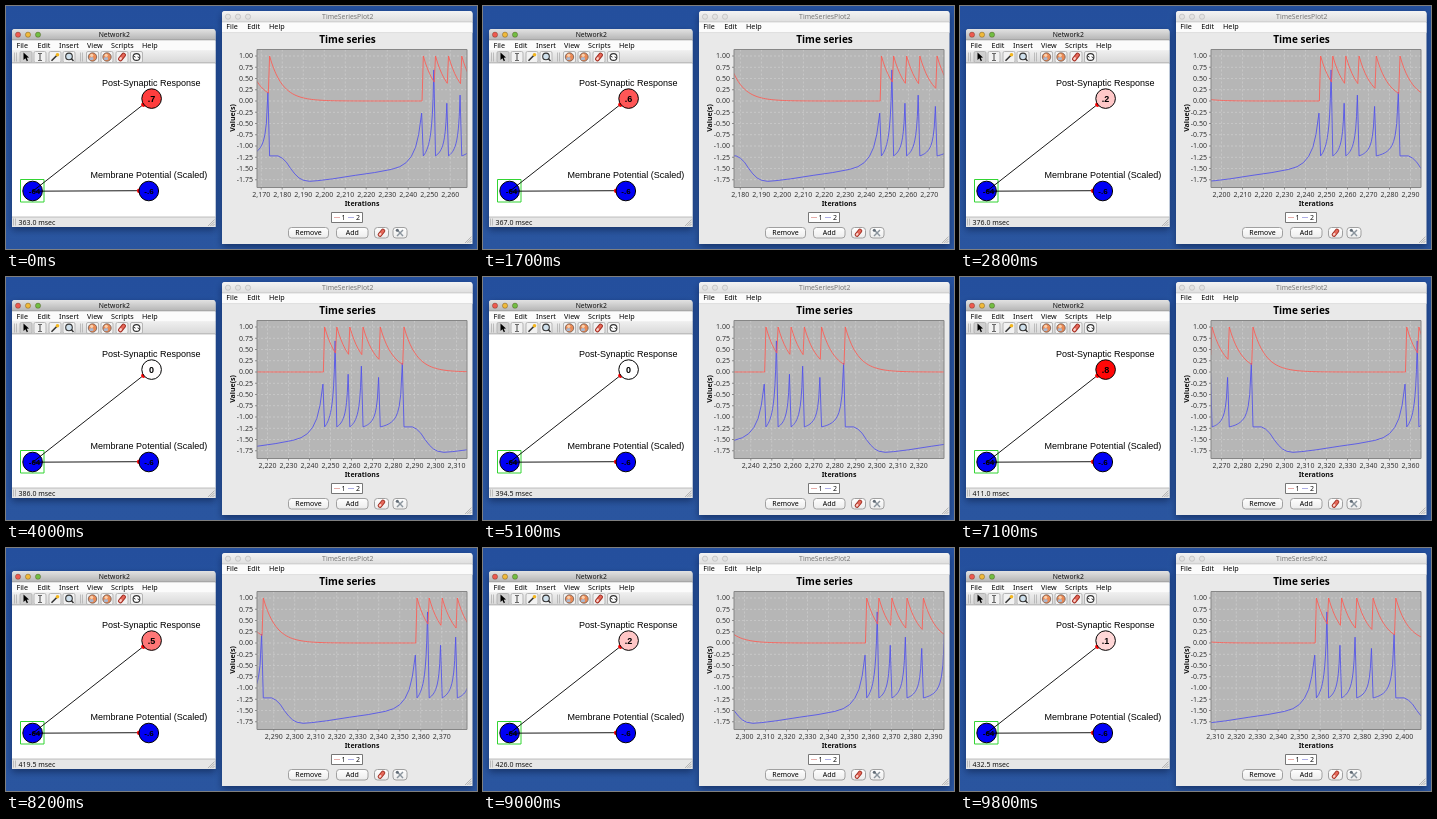
An HTML page with a canvas that plays this animation: 471x243 px, repeating every 10 s.

```html
<!DOCTYPE html>
<html lang="en">
<head>
<meta charset="utf-8">
<title>Spiking network</title>
<style>
html, body { margin: 0; width: 100%; height: 100%; overflow: hidden; background: #26509b; }
canvas { display: block; }
</style>
</head>
<body>
<canvas id="stage" width="471" height="243"></canvas>
<script>
const c = document.getElementById('stage').getContext('2d');
const LOOP = 10000, SANS = '"Noto Sans", "Open Sans", sans-serif', ARIAL = '"Liberation Sans", Arial, sans-serif';
const PLOT = { x: 251, y: 43.5, w: 210, h: 138 };
const REST = -1.22, DECAY = 6;

// Simulation clock: [seconds, simulated msec]; it idles before the run starts.
const clock = [[0, 363], [1.2, 363], [1.7, 367], [2.8, 376], [4, 386], [4.1, 386],
  [6.1, 403], [8.2, 419.5], [9.8, 432.5], [10, 432.5]];

// Spikes: [iteration, height reached just before it]
const peaks = [-0.27, 0.69, -0.05, 0.13, -0.12, 0.2];
const burst = its => its.map((it, i) => [it, peaks[i]]);
const spikes = [[2163, -0.12], [2174, 0.2],
  ...burst([2247.2, 2253, 2259.2, 2265.5, 2273.7, 2285]),
  ...burst([2358.2, 2364, 2370.2, 2377.4, 2385.2, 2396]), [2469, -0.27]];

// Slow recovery after a burst: [iterations since spike, potential]
const recovery = [[0, REST], [4, REST], [6, -1.27], [8, -1.36], [10, -1.5], [12, -1.62], [14, -1.71],
  [16, -1.76], [19, -1.785], [23, -1.77], [30, -1.73], [41, -1.65], [50, -1.59], [58, -1.52],
  [62, -1.46], [65, -1.37], [67.5, -1.23], [69.5, -1.03], [71, -0.74], [72.4, -0.27]];

const synapse = [], membrane = [];
for (let k = 0; k < spikes.length - 1; k++) {
  const a = spikes[k][0], [b, top] = spikes[k + 1], gap = b - a;
  for (let d = 0; d < gap - 0.6; d++) synapse.push([a + d, Math.exp(-d / DECAY)]);
  synapse.push([b - 0.6, Math.exp((0.6 - gap) / DECAY)]);
  if (gap > 40) {
    for (const [d, v] of recovery) membrane.push([a + d, v]);
  } else {
    const len = gap - 0.8, g = s => 1 / (s + 0.9);
    for (let i = 0; i <= 14; i++) {
      const s = len * (1 - i / 14);
      membrane.push([a + len - s, REST + (top - REST) * (g(s) - g(len)) / (g(0) - g(len))]);
    }
  }
}

function interp(pts, t) {
  let i = 1;
  while (i < pts.length - 1 && pts[i][0] < t) i++;
  const [x0, y0] = pts[i - 1], [x1, y1] = pts[i];
  return y0 + (y1 - y0) * (t - x0) / (x1 - x0);
}

function response(it) {
  const last = spikes.filter(s => s[0] <= it).pop();
  return Math.exp(-(it - last[0]) / DECAY);
}

function rect(x, y, w, h, fill, stroke, r = 0) {
  c.beginPath();
  c.roundRect(x, y, w, h, r);
  if (fill) { c.fillStyle = fill; c.fill(); }
  if (stroke) { c.strokeStyle = stroke; c.lineWidth = 1; c.stroke(); }
}

function disc(x, y, r, fill, stroke, lw = 1) {
  c.beginPath();
  c.arc(x, y, r, 0, 7);
  if (fill) { c.fillStyle = fill; c.fill(); }
  if (stroke) { c.strokeStyle = stroke; c.lineWidth = lw; c.stroke(); }
}

function line(x0, y0, x1, y1, color, lw = 1) {
  c.beginPath();
  c.moveTo(x0, y0);
  c.lineTo(x1, y1);
  c.strokeStyle = color;
  c.lineWidth = lw;
  c.stroke();
}

function text(s, x, y, size = 7, align = 'left', color = '#111', weight = '', family = SANS) {
  c.font = `${weight} ${size}px ${family}`;
  c.textAlign = align;
  c.fillStyle = color;
  c.fillText(s, x, y);
}

function fade(y0, y1, top, bottom) {
  const g = c.createLinearGradient(0, y0, 0, y1);
  g.addColorStop(0, top);
  g.addColorStop(1, bottom);
  return g;
}

function frame(x, y, w, h, title, active) {
  c.save();
  c.shadowColor = 'rgba(0,10,40,.45)';
  c.shadowBlur = 7;
  c.shadowOffsetY = 3;
  rect(x, y, w, h, '#e9e9e9', null, [3, 3, 0, 0]);
  c.restore();
  const bar = active ? fade(y, y + 11, '#e2e2e2', '#b4b4b4') : fade(y, y + 11, '#f3f3f3', '#dedede');
  rect(x, y, w, 11, bar, null, [3, 3, 0, 0]);
  line(x, y + 11, x + w, y + 11, active ? '#8a8a8a' : '#bcbcbc', 0.7);
  const lights = active ? ['#ee5a50', '#efb93b', '#72bd43'] : ['#e2e2e2', '#e2e2e2', '#e2e2e2'];
  lights.forEach((f, i) => disc(x + 6 + i * 10, y + 5.7, 2.6, f, active ? 'rgba(60,40,20,.55)' : '#b4b4b4', 0.6));
  text(title, x + w / 2 + 0.5, y + 8.4, 6.8, 'center', active ? '#111' : '#777', active ? '500' : '');
  rect(x, y + 11.4, w, 10.2, '#fbfbfb');
}

function menu(items, y) {
  for (const [s, x] of items) text(s, x, y, 7.2, 'left', '#000');
}

function grip(x, y) {
  for (let d = 2; d < 8; d += 2.2) line(x - d, y, x, y - d, '#999', 0.7);
}

function eraser(x, y, s = 1) {
  c.save();
  c.translate(x, y);
  c.scale(s, s);
  c.rotate(-0.9);
  rect(-4.3, -1.8, 8.6, 3.6, '#e8685a', '#a03024', 1.4);
  rect(-3.6, -1.2, 3, 2.2, '#f8cfc8', null, 1);
  c.restore();
}

function toolbar() {
  rect(6, 44.5, 203.5, 12.5, fade(44, 57, '#f0f0f0', '#d8d8d8'));
  line(6, 57, 209.5, 57, '#999', 0.8);
  for (const x of [8.5, 10.5, 74.5, 76.5]) line(x, 46.5, x, 55.5, '#aaa', 0.7);
  for (const x of [20, 34, 49, 63, 86.5, 101, 116, 130.5])
    rect(x - 6, 45.5, 12, 11, x === 20 ? '#cfcfcf' : '#f2f2f2', '#b5b5b5', 1.5);
  // pointer
  c.fillStyle = '#000';
  c.beginPath();
  c.moveTo(17.5, 46.5);
  c.lineTo(17.5, 54);
  c.lineTo(19.4, 52.3);
  c.lineTo(20.8, 55.2);
  c.lineTo(22, 54.5);
  c.lineTo(20.7, 51.8);
  c.lineTo(23, 51.5);
  c.fill();
  // text cursor
  line(34, 47.5, 34, 54.5, '#444');
  line(32, 47.5, 36, 47.5, '#666');
  line(32, 54.5, 36, 54.5, '#666');
  // wand
  line(45.5, 54.8, 51, 49.3, '#333', 1.6);
  disc(51.5, 48.7, 1.8, '#f2b51d');
  // magnifier
  disc(63, 50.4, 3.3, '#cfe0ec', '#333', 1.1);
  line(65.3, 52.6, 67.5, 54.9, '#333', 1.5);
  // balls
  for (const x of [86.5, 101]) {
    disc(x, 51, 4.2, '#ea8a55', '#6c5a52', 0.8);
    rect(x - 3, 51.2, 4, 2.8, '#a9b8d0', null, 1);
    disc(x - 0.8, 49.3, 1.6, '#fbd0ac');
  }
  eraser(116, 51);
  disc(130.5, 51, 3.4, '#fff', '#333', 1.1);
  line(127.5, 50, 129.5, 51.2, '#333');
  line(131.6, 50.8, 133.7, 52, '#333');
}

function network(ms, value) {
  frame(6, 23, 203.5, 198, 'Network2', true);
  menu([['File', 10.5], ['Edit', 31.5], ['Insert', 53], ['View', 81], ['Scripts', 105], ['Help', 136]], 42);
  toolbar();
  rect(6, 57.4, 203.5, 153.6, '#fff');

  rect(14.5, 173.5, 23.5, 22.5, null, '#33d433');
  disc(26.6, 185, 9.8, '#0000f5', '#000');
  line(27, 185, 138, 98, '#000', 0.9);
  line(27, 185.2, 133, 184.7, '#000', 0.9);
  disc(137.5, 98.6, 2.3, '#f00');
  disc(133.3, 184.8, 2.4, '#f00');
  const pale = Math.round(255 * (1 - Math.min(1, value * 1.15)));
  disc(145.6, 92.6, 9.8, `rgb(255,${pale},${pale})`, '#000');
  disc(142.8, 185, 9.8, '#0000f5', '#000');

  const tenths = Math.round(value * 10);
  const label = tenths === 0 ? '0' : tenths === 10 ? '1' : '.' + tenths;
  text(label, 145.5, 96, 9, 'center', '#000', 'bold', ARIAL);
  text('-64', 28.5, 188, 8, 'center', '#000', 'bold', ARIAL);
  text('-.6', 143, 188, 8, 'center', '#000', 'bold', ARIAL);
  text('Post-Synaptic Response', 96, 80, 9, 'left', '#000', '', ARIAL);
  text('Membrane Potential (Scaled)', 84.6, 172, 9, 'left', '#000', '', ARIAL);

  rect(6, 211, 203.5, 10, '#e6e6e6');
  line(6, 211, 209.5, 211, '#b0b0b0', 0.8);
  for (const x of [7.5, 9.5]) line(x, 212.5, x, 219.5, '#aaa', 0.7);
  text(ms.toFixed(1) + ' msec', 12.5, 218.6);
  grip(208.5, 220);
}

function curve(pts, px, py, color) {
  c.beginPath();
  for (const [it, v] of pts) c.lineTo(px(it), py(v));
  c.strokeStyle = color;
  c.lineWidth = 0.85;
  c.stroke();
}

function button(x, w, s) {
  rect(x, 221.5, w, 10.5, fade(221, 232, '#fff', '#ececec'), '#a0a0a0', 3);
  if (s) text(s, x + w / 2, 229.4, 7, 'center', '#000');
}

function chart(left) {
  const { x, y, w, h } = PLOT;
  const px = it => x + (it - left) * w / 100;
  const py = v => 95 - 45 * v;

  frame(216, 5, 250.5, 233, 'TimeSeriesPlot2', false);
  menu([['File', 220.3], ['Edit', 241.3], ['Help', 263]], 23.3);
  line(216, 26.6, 466.5, 26.6, '#d0d0d0', 0.6);
  text('Time series', 341.5, 36.8, 10, 'center', '#000', 'bold');

  rect(x, y, w, h, '#b6b6b6');
  c.save();
  c.beginPath();
  c.rect(x, y, w, h);
  c.clip();
  c.setLineDash([2, 2]);
  for (let i = -7; i <= 4; i++) line(x, py(i / 4), x + w, py(i / 4), '#cecece', 0.7);
  const first = Math.ceil(left / 10) * 10;
  for (let it = first; it <= left + 100; it += 10) line(px(it), y, px(it), y + h, '#cecece', 0.7);
  c.setLineDash([]);
  curve(membrane, px, py, '#5050ec');
  curve(synapse, px, py, '#ff5a52');
  c.restore();
  rect(x, y, w, h, null, '#868686');

  for (let i = -7; i <= 4; i++) {
    line(x - 2, py(i / 4), x, py(i / 4), '#777', 0.8);
    text((i / 4).toFixed(2), 247, py(i / 4) + 2.4, 7, 'right', '#333');
  }
  // the last tick label is left out when it would touch the edge
  for (let it = first; it < left + 97; it += 10) {
    line(px(it), y + h, px(it), y + h + 2, '#777', 0.8);
    text(it.toLocaleString('en-US'), px(it), 191, 7, 'center', '#333');
  }
  text('Iterations', 356, 200.2, 7, 'center', '#111', 'bold');
  c.save();
  c.translate(229, 112);
  c.rotate(-Math.PI / 2);
  text('Value(s)', 0, 0, 7, 'center', '#111', 'bold');
  c.restore();

  rect(325.5, 206.5, 31, 10, '#fff', '#777');
  line(328, 211.5, 334, 211.5, '#e09a96', 0.8);
  text('1', 335.6, 214);
  line(342, 211.5, 348, 211.5, '#9a9ae0', 0.8);
  text('2', 350, 214);

  button(282.5, 40, 'Remove');
  button(330.5, 31.5, 'Add');
  button(368.5, 14);
  button(387, 14);
  eraser(375.5, 226.8, 0.95);
  line(391, 230, 397, 224, '#8a949c', 1.5);
  line(391.3, 224, 397, 230, '#8b959e', 1.4);
  disc(391.3, 224.2, 1.5, '#616b75');
  grip(465.5, 237);
}

function draw(t) {
  const tick = Math.floor(t / 100) / 10;
  const ms = Math.round(interp(clock, tick) * 2) / 2;
  // while running, the plot is one iteration ahead of the clock text
  const left = 2168 + 2 * (ms - 363) + (ms > 363 ? 1 : 0);
  rect(0, 0, 471, 243, fade(0, 243, '#244f9d', '#2a559f'));
  network(ms, response(left + 100));
  chart(left);
}

function loop() {
  draw(performance.now() % LOOP);
  requestAnimationFrame(loop);
}
loop();
</script>
</body>
</html>
```
